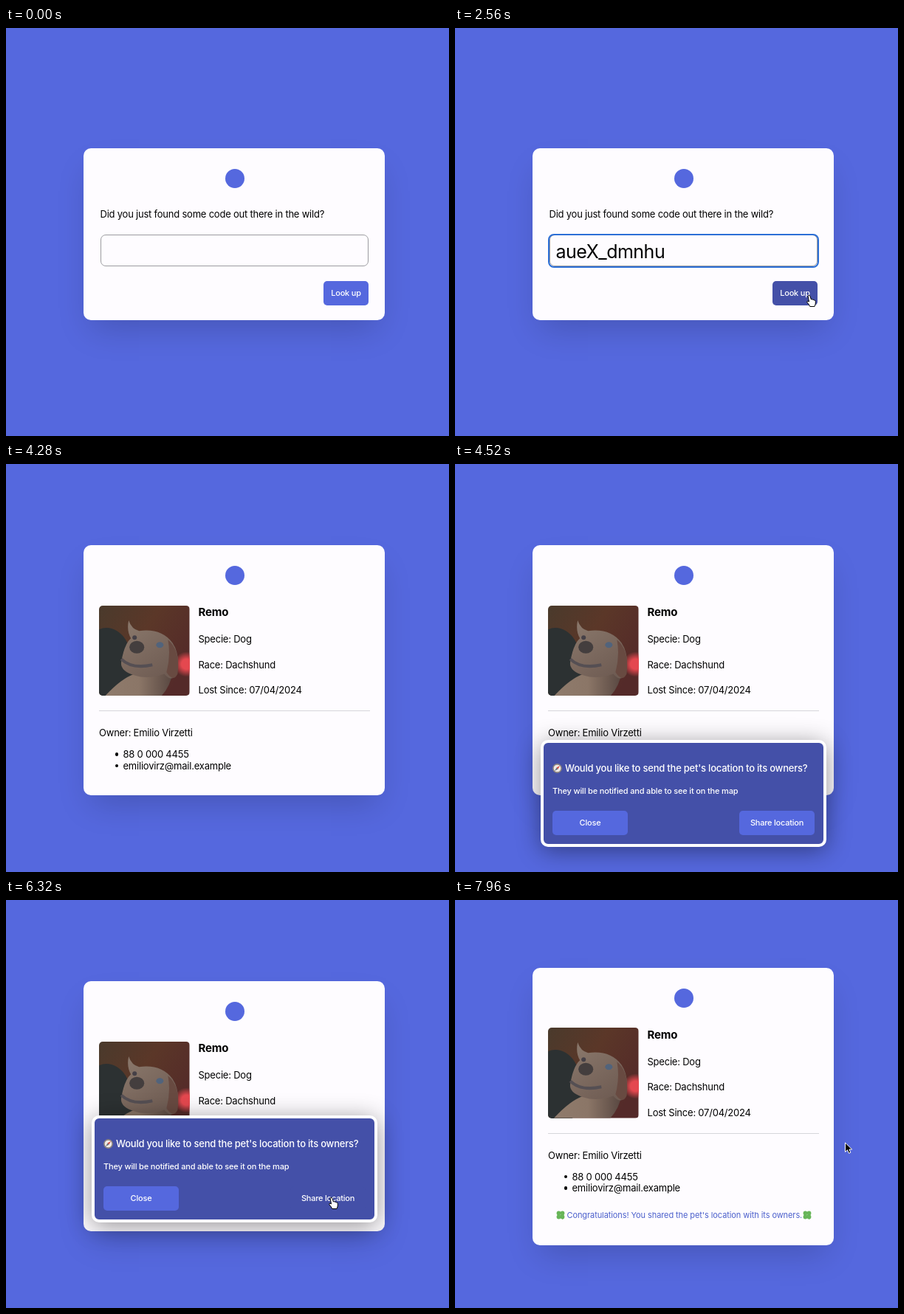
Recreate the animation shown at these times as an HTML page. Size 600 by 553 pixels, loop 8000 ms.

```html
<!DOCTYPE html>
<html lang="en">
<head>
<meta charset="utf-8">
<title>Lost pet lookup</title>
<style>
  html, body { margin: 0; width: 100%; height: 100%; overflow: hidden; }
  body { position: relative; background: #5568de; font: 13px Inter, "Open Sans", sans-serif; letter-spacing: -.017em; color: #000; }
  div, p, svg { position: absolute; margin: 0; box-sizing: border-box; }
  p { white-space: pre; line-height: 20px; transform: translateY(-10px); }
  [hidden] { display: none; }
  .card { left: 105px; width: 408px; border-radius: 10px; background: #fefcff; box-shadow: 0 21px 42px -10px rgba(0, 0, 0, .18); }
  .logo { left: 191.5px; top: 28px; width: 26px; height: 26px; border-radius: 50%; background: #5568de; }
  .small { font-size: 11px; letter-spacing: -.008em; }
  .button { border-radius: 5px; background: #5568de; color: #fff; font-size: 11px; font-weight: 500; line-height: 32.5px; height: 32.5px; text-align: center; }
  .button.hover { background: #4450a8; }
  #input { left: 23px; top: 117px; width: 363px; height: 43px; border: 1px solid #9c9ca0; border-radius: 7px; }
  #ring { left: 21px; top: 116px; width: 367px; height: 45.5px; border: 2.5px solid #2c6fd6; border-radius: 8px; }
  #code { left: 31.5px; top: 139.5px; font-size: 25px; letter-spacing: -.02em; }
  #photo { left: 21px; top: 81.5px; width: 122.5px; height: 122.5px; border-radius: 5px; }
  .rule { left: 21px; top: 224px; width: 367px; height: 1px; background: #d6d6da; }
  .dot { left: 42.5px; width: 4.5px; height: 4.5px; border-radius: 50%; background: #000; }
  #thanks { left: 0; top: 335px; width: 408px; height: 0; color: #4c60cc; }
  #modal { left: 116px; width: 387px; height: 145px; border: 4px solid #fff; border-radius: 10px; background: #4450a8; color: #fff; font-weight: 500; box-shadow: 0 5px 32px rgba(0, 0, 0, .42); }
  #modal .small { letter-spacing: -.015em; }
  #cursor { left: 0; top: 0; width: 20px; height: 22px; overflow: visible; }
</style>
</head>
<body>
<div class="card" id="search" style="top:163px;height:233px">
  <div class="logo"></div>
  <p style="left:22.5px;top:89px">Did you just found some code out there in the wild?</p>
  <div id="input"></div>
  <div id="ring"></div>
  <p id="code">aueX_dmnhu</p>
  <div class="button" id="lookup" style="left:325px;top:180px;width:61px">Look up</div>
</div>

<div class="card" id="result">
  <div class="logo"></div>
  <svg id="photo" viewBox="0 0 122 122">
    <defs>
      <linearGradient id="wall" x2="1" y2=".6"><stop stop-color="#4a3a2c"/><stop offset=".5" stop-color="#5b3728"/><stop offset="1" stop-color="#542a29"/></linearGradient>
      <radialGradient id="glow"><stop offset=".4" stop-color="#e4484f"/><stop offset="1" stop-color="#e4484f" stop-opacity="0"/></radialGradient>
      <linearGradient id="fur" x2=".7" y2="1"><stop stop-color="#8c7a6d"/><stop offset="1" stop-color="#6f5c53"/></linearGradient>
      <linearGradient id="chest"><stop stop-color="#8f7b6c"/><stop offset=".5" stop-color="#8b7667"/><stop offset="1" stop-color="#574640"/></linearGradient>
    </defs>
    <rect width="122" height="122" fill="url(#wall)"/>
    <ellipse cx="10" cy="82" rx="36" ry="52" fill="#2c3132"/>
    <circle cx="118" cy="79" r="17" fill="url(#glow)"/>
    <path d="M8 122Q30 98 48 92L100 88Q96 110 84 122Z" fill="url(#chest)"/>
    <path d="M40 20Q44 32 54 34Q84 30 99 50Q110 66 105 92Q98 104 88 92Q66 100 48 94Q28 88 30 76Q34 52 43 44Q37 34 40 20Z" fill="url(#fur)"/>
    <path d="M93 46Q110 60 106 92Q100 104 91 90Q97 68 93 46Z" fill="#684a41"/>
    <path d="M30 72Q44 86 72 80" fill="none" stroke="#554f53" stroke-width="4"/>
    <ellipse cx="51" cy="56" rx="10" ry="8.5" fill="#443e3e"/>
    <ellipse cx="82" cy="53" rx="5" ry="4" fill="#51637b"/>
    <circle cx="48" cy="43" r="3" fill="#454047"/>
  </svg>
  <p style="left:155.5px;top:91px;font-size:15px;font-weight:700">Remo</p>
  <p style="left:155.5px;top:127px">Specie: Dog</p>
  <p style="left:155.5px;top:161.5px">Race: Dachshund</p>
  <p style="left:155.5px;top:196px">Lost Since: 07/04/2024</p>
  <div class="rule"></div>
  <p style="left:21px;top:254px">Owner: Emilio Virzetti</p>
  <div class="dot" style="top:281px"></div>
  <p style="left:53.5px;top:283px">88 0 000 4455</p>
  <div class="dot" style="top:296.5px"></div>
  <p style="left:53.5px;top:298.5px">emiliovirz@mail.example</p>
  <div id="thanks">
    <svg style="left:32px;top:-6px" width="12" height="12"><use href="#clover"/></svg>
    <p class="small" style="left:46.5px;top:0">Congratulations! You shared the pet's location with its owners.</p>
    <svg style="left:365.5px;top:-6px" width="12" height="12"><use href="#clover"/></svg>
  </div>
</div>

<div id="modal">
  <svg style="left:12px;top:27.5px" width="13" height="13">
    <circle cx="6.5" cy="6.5" r="5.6" fill="#eeeae6" stroke="#8d8580" stroke-width="1.6"/>
    <path d="M10 3L7.5 7.5L5.5 5.5Z" fill="#d8453c"/>
    <path d="M3 10L5.5 5.5L7.5 7.5Z" fill="#666d78"/>
  </svg>
  <p style="left:29px;top:34px">Would you like to send the pet's location to its owners?</p>
  <p class="small" style="left:12px;top:65px">They will be notified and able to see it on the map</p>
  <div class="button" style="left:12px;top:92px;width:102px">Close</div>
  <div class="button" id="share" style="left:265px;top:92px;width:102px">Share location</div>
</div>

<svg id="cursor">
  <path id="arrow" d="M0 0V12.5L3 9.8L5 14.3L7.3 13.3L5.4 9H9.2Z" fill="#000" stroke="#fff"/>
  <path id="hand" d="M-1 0Q1-1.5 2 .5L3.4 5Q5 4 5.8 5.4Q7 4.8 7.7 6Q9 5.8 9.3 7.5Q9.8 11 8 14.5H1.8Q.5 11.5-2.2 8.8Q-2.6 6.8-.6 7.4L.5 8Z" fill="#fff" stroke="#000"/>
  <path id="beam" d="M-3-7Q0-7 0-5V5Q0 7-3 7M3-7Q0-7 0-5V5Q0 7 3 7" fill="none" stroke="#222"/>
</svg>

<svg width="0" height="0">
  <g id="clover" fill="#67b558">
    <path d="M6 6L9 11.5" stroke="#4b8f42" stroke-width="1.3"/>
    <circle cx="3.5" cy="3.5" r="2.9"/><circle cx="8.5" cy="3.5" r="2.9"/>
    <circle cx="3.5" cy="8.5" r="2.9"/><circle cx="8.5" cy="8.5" r="2.9"/>
  </g>
</svg>

<script>
const LOOP = 8000;
const FOCUS = 1280, PASTE = 1600, SUBMIT = 3200, FOUND = 3840;
const SLIDE_IN = 4120, SHARED = 7200, SLIDE_OUT = 7240;
const SLIDE_DISTANCE = 420;

// time, x, y of the pointer
const POINTER = [
  [440, 462, -22], [1200, 380, 301], [1680, 380, 301], [2080, 479, 363],
  [FOUND, 479, 363], [4000, 612, 345], [5080, 612, 345],
  [5600, 440, 404], [6680, 440, 404], [7040, 528.5, 329],
];

const el = Object.fromEntries([...document.querySelectorAll("[id]")].map(node => [node.id, node]));
const clamp = p => Math.min(1, Math.max(0, p));
const smooth = p => p * p * (3 - 2 * p);
const show = (node, visible) => node.toggleAttribute("hidden", !visible);

// cubic-bezier(.25, .1, .25, 1)
function ease(p) {
  let low = 0, high = 1;
  for (let i = 0; i < 20; i++) {
    const s = (low + high) / 2;
    if (.75 * s * (1 - s) + s ** 3 < p) low = s; else high = s;
  }
  return .3 * low * (1 - low) ** 2 + 3 * low * low * (1 - low) + low ** 3;
}

function pointerAt(t) {
  const next = POINTER.findIndex(key => key[0] > t);
  if (next === 0) return POINTER[0].slice(1);
  if (next < 0) return POINTER.at(-1).slice(1);
  const [t0, x0, y0] = POINTER[next - 1], [t1, x1, y1] = POINTER[next];
  const p = smooth((t - t0) / (t1 - t0));
  return [x0 + (x1 - x0) * p, y0 + (y1 - y0) * p];
}

function render(t) {
  const found = t >= FOUND, shared = t >= SHARED;
  show(el.search, !found);
  show(el.ring, t >= FOCUS && t < SUBMIT);
  show(el.code, t >= PASTE);

  const top = shared ? 91.5 : 110, height = shared ? 376 : 339;
  show(el.result, found);
  show(el.thanks, shared);
  el.result.style.top = top + "px";
  el.result.style.height = height + "px";

  const raised = ease(clamp((t - SLIDE_IN) / 800)) - ease(clamp((t - SLIDE_OUT) / 600));
  show(el.modal, raised > 0);
  el.modal.style.top = top + height - 157 + SLIDE_DISTANCE * (1 - raised) + "px";

  const [x, y] = pointerAt(t);
  const inside = (left, topEdge, right, bottom) => x > left && x < right && y > topEdge && y < bottom;
  const onLookup = !found && inside(430, 343, 491, 376);
  const onShare = found && inside(385, 388, 487, 421);
  const onInput = !found && inside(128, 280, 491, 323);
  el.lookup.classList.toggle("hover", onLookup);
  el.share.classList.toggle("hover", onShare);
  el.cursor.style.transform = `translate(${x}px, ${y}px)`;
  const onButton = onLookup || onShare;
  el.hand.style.display = onButton ? "" : "none";
  el.beam.style.display = onInput ? "" : "none";
  el.arrow.style.display = onButton || onInput ? "none" : "";
}

const start = performance.now();
function tick() {
  render((performance.now() - start) % LOOP);
  requestAnimationFrame(tick);
}
tick();
</script>
</body>
</html>
```
